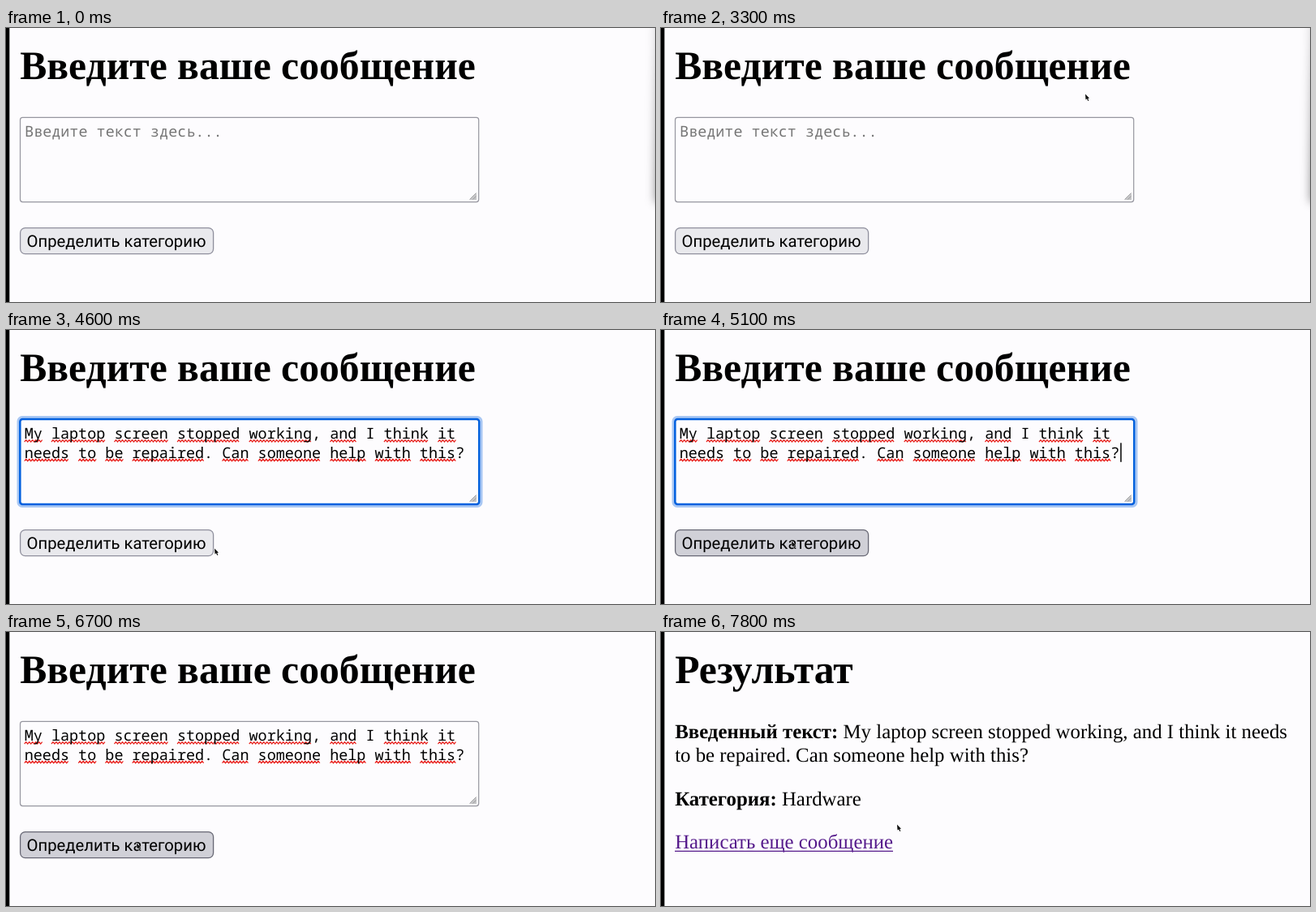
These frames come from a looping animation (800 by 338 pixels, 8 s). An HTML page:

```html
<!DOCTYPE html>
<html lang="ru">
<head>
<meta charset="utf-8">
<title>Введите ваше сообщение</title>
<style>
  html, body { margin: 0; width: 100%; height: 100%; overflow: hidden; background: #fdfcfe; }
  svg { display: block; width: 100vw; height: 100vh; }
  text { text-rendering: geometricPrecision; fill: #000; }
  .h1, .body { font-family: "Liberation Serif", "Times New Roman", serif; }
  .h1 { font-size: 49.66px; font-weight: 700; }
  .body { font-size: 24.83px; }
  .bold { font-weight: 700; }
  .mono { font-family: "Noto Sans Mono", "DejaVu Sans Mono", monospace; font-size: 18.47px; }
  .label { font-family: Roboto, "Open Sans", sans-serif; font-size: 20.27px; }
  #hint { fill: #757575; }
  #link { fill: #551a8b; }
</style>
</head>
<body>
<svg viewBox="0 0 800 338">
  <defs>
    <filter id="soft" x="-400%" width="900%" y="-20%" height="140%">
      <feGaussianBlur stdDeviation="6"/>
    </filter>
    <linearGradient id="fade" x2="0" y2="1">
      <stop offset=".2" stop-opacity=".14"/>
      <stop offset=".9" stop-opacity=".4"/>
    </linearGradient>
  </defs>
  <rect width="800" height="338" fill="#fdfcfe"/>

  <g id="form">
    <text class="h1" x="17.2" y="63.4">Введите ваше сообщение</text>
    <rect id="box" x="17.5" y="110.4" width="565.2" height="104.2" rx="3" fill="none" stroke="#96969f" stroke-width="1.2"/>
    <g id="focus" fill="none">
      <rect x="15" y="107.5" width="571" height="110" rx="5" stroke="#a9c7f3" stroke-width="3"/>
      <rect x="17.3" y="110" width="566" height="105" rx="3" stroke="#0060df" stroke-width="2.5"/>
    </g>
    <path d="M571.5 212L580 203.5V212Z" fill="#c4c4c6"/>
    <path d="M571.5 211.5l8-8M575.5 211.5l4-4" fill="none" stroke="#a2a2a4" stroke-width="1"/>
    <text class="mono" id="hint" x="23" y="134">Введите текст здесь...</text>
    <g id="typed">
      <path id="waves" fill="none" stroke="#e8201c" stroke-width="1.2"/>
    </g>
    <rect id="caret" width="1.5" height="23.5"/>
    <rect id="button" x="17.6" y="246.6" width="238" height="32" rx="6" stroke-width="1.3"/>
    <text class="label" x="25.5" y="270.2">Определить категорию</text>
  </g>

  <g id="result">
    <text class="h1" x="17.2" y="63.4">Результат</text>
    <text class="body" x="17.2" y="131"><tspan class="bold">Введенный текст:</tspan> My laptop screen stopped working, and I think it needs</text>
    <text class="body" x="17.2" y="159.7">to be repaired. Can someone help with this?</text>
    <text class="body" x="17.2" y="213.7"><tspan class="bold">Категория:</tspan> Hardware</text>
    <text class="body" id="link" x="17.2" y="267.4">Написать еще сообщение</text>
    <path d="M17 270.4H286" stroke="#551a8b" stroke-width="1.2"/>
  </g>

  <rect id="shadow" x="800" y="-60" width="40" height="275" fill="url(#fade)" filter="url(#soft)"/>
  <rect width="4.3" height="338"/>

  <path id="arrow" d="M0 0L.5 7L2 5.8L3.3 8.5L4.4 7.9L3.2 5.4L5 5.1Z" fill="#111"
        stroke="#fff" stroke-width=".9" paint-order="stroke" stroke-linejoin="round"/>
  <path id="beam" d="M-2.3 -4.3H-.6L0 -3.8L.6 -4.3H2.3M0 -3.8V3.8M-2.3 4.3H-.6L0 3.8L.6 4.3H2.3"
        fill="none" stroke="#333" stroke-width="1.1"/>
</svg>

<script>
const LOOP = 8000, TICK = 100;
const COL = 11.082, LEFT = 22.7;
const FOCUS = 3600, PASTE = 3900, BLUR = 6600, RESULT = 6800;
const SHADOW_END = 3400, BLINK = 500, CARET_END = 6400;

const lines = [
  { text: "My laptop screen stopped working, and I think it", y: 134 },
  { text: "needs to be repaired. Can someone help with this?", y: 157.7 }
];

// Pointer keys: time, x, y
const moves = [
  [3300, 523, 81.5], [3400, 470, 92], [3500, 370, 118], [3600, 270, 134.3],
  [4200, 270, 134.3], [4400, 266, 195], [4600, 257, 269.5], [4800, 218, 267],
  [5000, 172, 261], [5100, 161, 260.5], [7300, 161, 260.5], [7400, 176, 240],
  [7500, 214, 206], [7600, 250, 188], [7700, 280, 216], [7800, 291, 237.6]
];

const $ = id => document.getElementById(id);
const show = (id, on) => $(id).setAttribute("visibility", on ? "inherit" : "hidden");
const place = (id, x, y) => $(id).setAttribute("transform", `translate(${x} ${y})`);
const inside = ([x, y], l, t, r, b) => x > l && x < r && y > t && y < b;

function wave(x, end, y) {
  let d = `M${x} ${y + 1.2}`;
  for (let up = true; x + 2 <= end; up = !up) {
    x += 2;
    d += `L${x} ${up ? y - 1.2 : y + 1.2}`;
  }
  return d;
}

function buildText() {
  let d = "";
  for (const { text, y } of lines) {
    const node = document.createElementNS("http://www.w3.org/2000/svg", "text");
    node.setAttribute("class", "mono");
    node.setAttribute("x", LEFT);
    node.setAttribute("y", y);
    node.textContent = text;
    $("typed").append(node);
    for (const m of text.matchAll(/[A-Za-z]{2,}/g)) {
      const x = LEFT + m.index * COL;
      d += wave(x, x + m[0].length * COL, y + 2.8);
    }
  }
  $("waves").setAttribute("d", d);
}

function pointerAt(t) {
  const next = moves.findIndex(m => m[0] > t);
  if (next < 0) return moves[moves.length - 1].slice(1);
  if (next === 0) return null;
  const [t0, x0, y0] = moves[next - 1], [t1, x1, y1] = moves[next];
  const k = (t - t0) / (t1 - t0);
  return [x0 + (x1 - x0) * k, y0 + (y1 - y0) * k];
}

function caretOn(t) {
  if (t < FOCUS || t >= CARET_END) return false;
  return t < PASTE || Math.floor((t - PASTE) / BLINK) % 2 === 0;
}

function draw(t) {
  const onForm = t < RESULT, pasted = t >= PASTE;
  const focused = t >= FOCUS && t < BLUR;
  show("form", onForm);
  show("result", !onForm);
  show("shadow", t < SHADOW_END);
  show("focus", focused);
  show("hint", !pasted);
  show("typed", pasted);
  show("caret", caretOn(t));
  place("caret", pasted ? 566.2 : 23, pasted ? 139.3 : 115.5);

  const p = pointerAt(t);
  const overBox = p && onForm && inside(p, 17, 110, 583, 215);
  const overButton = p && onForm && inside(p, 17, 246, 256, 279);
  show("arrow", p && !overBox);
  show("beam", overBox);
  if (p) {
    place("arrow", ...p);
    place("beam", ...p);
  }
  $("button").setAttribute("fill", overButton ? "#d0d0d7" : "#e9e9ed");
  $("button").setAttribute("stroke", overButton ? "#676774" : "#8f8f9d");
}

buildText();
const start = performance.now();
function frame() {
  const t = (performance.now() - start) % LOOP;
  draw(Math.floor(t / TICK) * TICK);
  requestAnimationFrame(frame);
}
frame();
</script>
</body>
</html>
```
